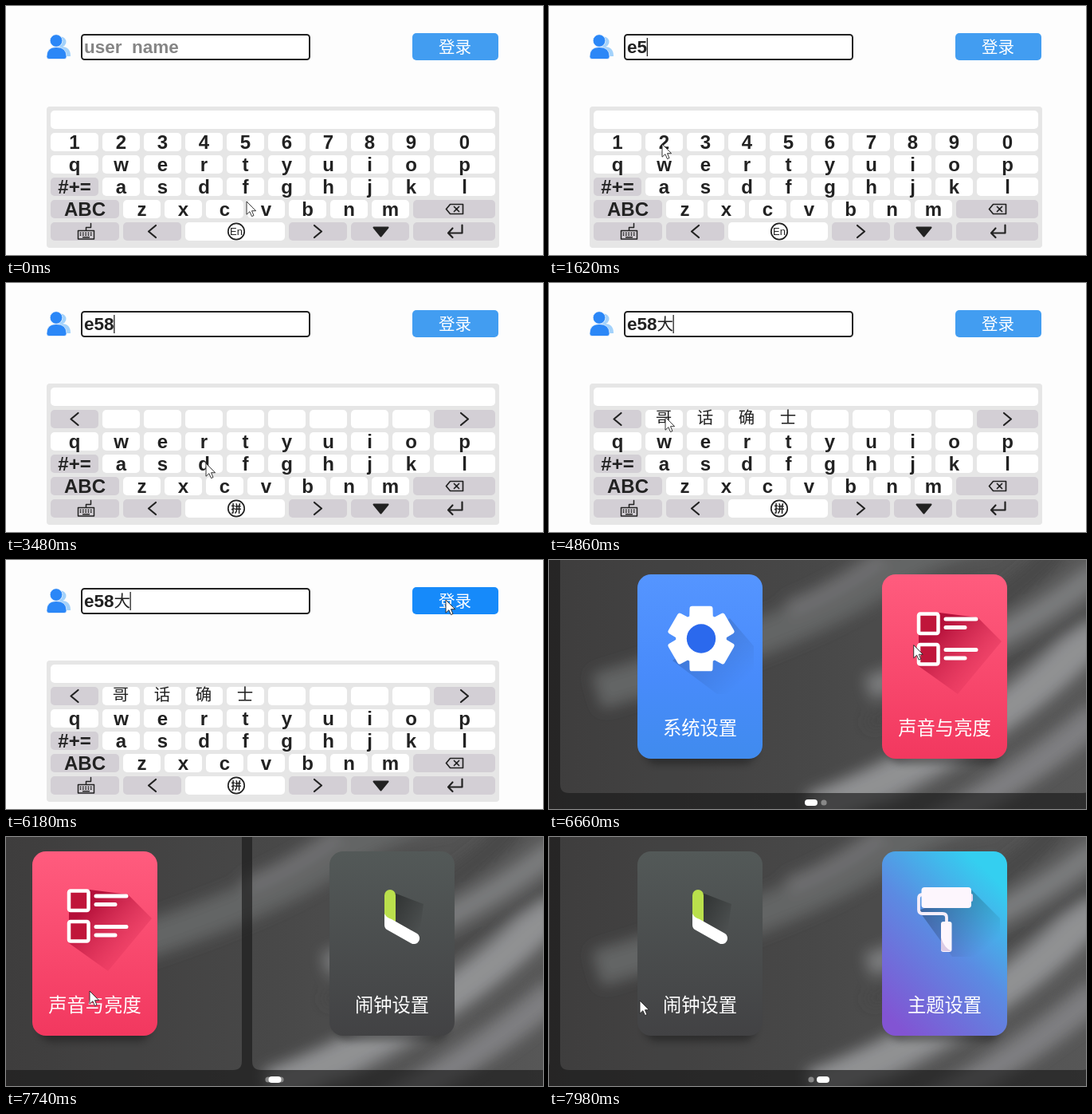
These frames come from a looping animation (674 px wide and 312 px high, 8000 ms). An HTML page:

```html
<!DOCTYPE html>
<html lang="zh-CN">
<head>
<meta charset="utf-8">
<title>Keyboard and home screen</title>
<style>
html, body { margin: 0; width: 100%; height: 100%; overflow: hidden; background: #fdfdfd; }
svg { display: block; width: 674px; height: 312px; }
text { font-family: "Liberation Sans", Arial, "Noto Sans CJK SC", "Noto Sans CJK", sans-serif; }
.key { font-size: 24px; font-weight: bold; fill: #222; text-anchor: middle; }
.han { font-family: "Noto Sans CJK SC", "Noto Sans CJK", sans-serif; font-weight: 300; font-size: 20.5px; text-anchor: middle; }
.label { font-family: "Noto Sans CJK SC", "Noto Sans CJK", sans-serif; font-size: 23.3px; fill: #fff; text-anchor: middle; }
.entry { font-size: 22.5px; font-weight: bold; white-space: pre; }
.line { fill: none; stroke: #222; stroke-width: 2.2; stroke-linecap: round; stroke-linejoin: round; }
</style>
</head>
<body>
<svg viewBox="0 0 674 312" xmlns="http://www.w3.org/2000/svg">
  <defs>
    <linearGradient id="blue" x2="0" y2="1"><stop stop-color="#5595ff"/><stop offset=".55" stop-color="#488bfb"/><stop offset="1" stop-color="#408bee"/></linearGradient>
    <linearGradient id="red" x2="0" y2="1"><stop stop-color="#ff5c7e"/><stop offset="1" stop-color="#f2385f"/></linearGradient>
    <linearGradient id="gray" x2="0" y2="1"><stop stop-color="#535958"/><stop offset="1" stop-color="#424244"/></linearGradient>
    <linearGradient id="theme" x1=".85" y1="0" x2=".2" y2="1"><stop offset=".08" stop-color="#34cff0"/><stop offset=".5" stop-color="#5b8be2"/><stop offset="1" stop-color="#8254d3"/></linearGradient>
    <linearGradient id="shade" x1="0" y1="0" x2=".85" y2=".85"><stop offset=".2" stop-opacity=".36"/><stop offset="1" stop-opacity="0"/></linearGradient>
    <linearGradient id="crimson" x1="0" y1="0" x2=".85" y2=".85"><stop offset=".25" stop-color="#b00c36" stop-opacity=".95"/><stop offset="1" stop-color="#d02850" stop-opacity="0"/></linearGradient>
    <linearGradient id="base"><stop stop-color="#282727"/><stop offset=".5" stop-color="#333"/><stop offset="1" stop-color="#444"/></linearGradient>
    <filter id="soft" filterUnits="userSpaceOnUse" x="-60" y="-60" width="800" height="440"><feGaussianBlur stdDeviation="9"/></filter>
    <filter id="drop" x="-20%" y="-20%" width="140%" height="140%"><feGaussianBlur stdDeviation="5"/></filter>
  </defs>

  <g id="login">
    <rect width="674" height="312" fill="#fdfdfd"/>
    <g fill="#a3d2fb"><circle cx="69" cy="45" r="6.5"/><path d="M60 63q0-12 10-12 11 0 11 12z"/></g>
    <g fill="#2b87f7" stroke="#fdfdfd" stroke-width=".7"><circle cx="63" cy="43.5" r="7.8"/><path d="M51 63.5q0-12 12-12 13 0 13 12 0 3-3 3H54q-3 0-3-3z"/></g>
    <rect x="95" y="36" width="286" height="31" rx="3.5" fill="#fff" stroke="#222" stroke-width="2"/>
    <text id="entry" class="entry" x="98" y="59"></text>
    <rect id="caret" y="40" width="1.3" height="23" fill="#222"/>
    <rect id="button" x="510" y="34" width="108" height="34" rx="5"/>
    <text class="han" x="563.5" y="58.5" fill="#fff">登录</text>
    <rect x="51" y="126" width="568" height="177" rx="4" fill="#e6e6e6"/>
    <rect x="56" y="131" width="558" height="23" rx="5" fill="#fff"/>
    <text id="pinyin" x="61" y="149" font-size="20" font-weight="bold" fill="#222"></text>
    <g id="keys"></g>
    <g id="digits"></g>
    <g id="picks"></g>
  </g>

  <g id="home">
    <rect width="674" height="312" fill="url(#base)"/>
    <g filter="url(#soft)" fill="none" id="folds"></g>
    <g id="pages"></g>
    <g id="dots"><circle r="3.6" cx="329" cy="304" fill="#888"/><circle r="3.6" cx="345" cy="304" fill="#888"/><rect id="pill" y="300" width="16" height="8" rx="4" fill="#fff"/></g>
  </g>

  <path id="mouse" d="M0 0V16.2L3.9 12.7 6.5 18.6 9 17.5 6.5 11.7H11.6Z" fill="#fff" stroke="#222" stroke-width=".9"/>
</svg>
<script>
const $ = id => document.getElementById(id);
const add = (id, html) => $(id).insertAdjacentHTML('beforeend', html);
const PITCH = 680;

// Keyboard
const colX = i => i ? 69 + 52 * i : 56;
const colW = i => i === 0 ? 60 : i === 9 ? 77 : 47;
const rowY = r => 159 + 28 * r;
function key(into, x, w, row, body = '', special = false) {
  const cx = x + w / 2, y = rowY(row);
  const inner = body.startsWith('<')
    ? `<g transform="translate(${cx} ${y + 11.5})">${body}</g>`
    : `<text class="key" x="${cx}" y="${y + 19.5}">${body}</text>`;
  add(into, `<rect x="${x}" y="${y}" width="${w}" height="23" rx="5" fill="${special ? '#d3cfd5' : '#fff'}"/>${inner}`);
}
const chevron = s => `<path class="line" d="M${4.5 * s}-7.5L${-4.5 * s} 0 ${4.5 * s} 7.5"/>`;
const ring = inner => `<g transform="translate(1.5 0)"><circle class="line" r="10.2" style="stroke-width:1.7"/>${inner}</g>`;
const icons = {
  board: `<g transform="translate(1.5 0)"><path class="line" style="stroke-width:1.5" d="M-10-1H10V9.500H-10ZM0-1V-5H6V-10"/>
    <path class="line" style="stroke-width:1.8;stroke-dasharray:.1 3.2" d="M-7 2H8M-7 4.500H8"/><path class="line" style="stroke-width:1.4" d="M-4 7.300H4"/></g>`,
  back: `<path class="line" style="stroke-width:1.7" d="M-10 0L-5-6H11V6H-5ZM0-3L6 3M6-3L0 3"/>`,
  down: `<path d="M-8-5H10L1 6Z" fill="#222" stroke="#222" stroke-width="2" stroke-linejoin="round"/>`,
  enter: `<path class="line" d="M10-8V2H-7M-2-4L-7.500 2-2 7.500"/>`,
  en: ring('<text class="key" y="4.500" style="font-size:13px;font-weight:normal">En</text>'),
  pin: ring('<text class="han" y="4.800" style="font-size:13px;font-weight:700" fill="#222">拼</text>')
};
[...'1234567890'].forEach((c, i) => {
  key('digits', colX(i), colW(i), 0, c);
  const edge = i === 0 || i === 9;
  key('picks', colX(i), colW(i), 0, edge ? chevron(i ? -1 : 1) : '', edge);
  if (!edge) add('picks', `<text class="han pick" x="${colX(i) + 23}" y="176" fill="#222"></text>`);
});
[...'qwertyuiop'].forEach((c, i) => key('keys', colX(i), colW(i), 1, c));
['#+=', ...'asdfghjkl'].forEach((c, i) => key('keys', colX(i), colW(i), 2, c, !i));
key('keys', 56, 86, 3, 'ABC', true);
[...'zxcvbnm'].forEach((c, i) => key('keys', 147 + 52 * i, 47, 3, c));
key('keys', 511, 103, 3, icons.back, true);
key('keys', 56, 86, 4, icons.board, true);
key('keys', 147, 73, 4, chevron(1), true);
key('digits', 225, 125, 4, icons.en);
key('picks', 225, 125, 4, icons.pin);
key('keys', 355, 73, 4, chevron(-1), true);
key('keys', 433, 73, 4, icons.down, true);
key('keys', 511, 103, 4, icons.enter, true);

// Backdrop folds: path, width, tone
[['M60 165Q300 95 400 32T560-30', 46, '#515253'], ['M300 62Q360 40 420-5', 22, '#5e5f60'],
 ['M400 160Q560 115 690 15', 30, '#6c6d6e'], ['M330 315Q560 228 690 85', 46, '#838486'],
 ['M470 340Q600 272 690 195', 36, '#6f7072'], ['M400 205Q570 150 690 58', 15, '#333'],
 ['M420 310Q590 255 690 160', 14, '#444'], ['M470 100Q570 60 640-15', 26, '#303030']]
  .forEach(([d, w, c]) => add('folds', `<path d="${d}" stroke="${c}" stroke-width="${w}"/>`));

// Cards, drawn around their own top left corner
function gear() {
  const pts = [];
  for (let k = 0; k < 6; k++)
    for (const [r, d] of [[29, -24], [39.5, -17], [39.5, 17], [29, 24]]) {
      const a = (k * 60 - 90 + d) * Math.PI / 180;
      pts.push((80 + r * Math.cos(a)).toFixed(1) + ',' + (80.5 + r * Math.sin(a)).toFixed(1));
    }
  return `<path d="M44 108L116 55 146 90V150H100Z" fill="url(#shade)" opacity=".5"/>
    <polygon points="${pts.join(' ')}" fill="#fff" stroke="#fff" stroke-width="6" stroke-linejoin="round"/>
    <circle cx="80" cy="80.5" r="18.2" fill="#2b69ed"/>`;
}
const item = y => `<rect x="46" y="${y}" width="24.500" height="24.500" rx="2" fill="#c0153a" stroke-width="4.500"/>
  <path d="M80 ${y + 6.500}H118M80 ${y + 17}H104" stroke-width="5" stroke-linecap="round"/>`;
const art = {
  gear: gear(),
  list: `<path d="M46 115V72L72 48 120 54 150 84 95 150Z" fill="url(#crimson)"/>
    <g stroke="#fff" fill="none">${item(49.5)}${item(88)}</g>`,
  clock: `<path d="M76 50L118 66 112 110 76 90Z" fill="url(#shade)"/>
    <path d="M69 55a7 7 0 0 1 14 0V92H69Z" fill="#bae04c"/>
    <path d="M69 78Q71 83 78 85L110 103a7.200 7.200 0 0 1-7 12.500L72 98Q69 96 69 92Z" fill="#fff"/>`,
  roller: `<path d="M46 74L112 48 148 84V132H88Z" fill="url(#shade)" opacity=".8"/>
    <path d="M51 54Q46 54 46 59V73Q46 78 51 78H76Q81 78 81 83V90" fill="none" stroke="#f6eef9" stroke-width="3.800"/>
    <rect x="108" y="53" width="6" height="10" rx="2" fill="#e3d5ef"/>
    <rect x="49.500" y="45" width="62.500" height="26" rx="4" fill="#fdf6fd"/>
    <rect x="74" y="88" width="13.500" height="38" rx="3" fill="#fdf6fd"/><path d="M74 108Q78 121 87 125H77Q74 125 74 122Z" fill="#dccbe5"/>`
};
// Everything around the two panels is dimmed
const panel = x => `M${x}-30H${x + 667}V281q0 11-11 11H${x + 11}q-11 0-11-11Z`;
const panels = panel(14) + panel(14 + PITCH);
add('pages', `<path d="M-700-40H2100V320H-700Z${panels}" fill-rule="evenodd" fill="#262525" fill-opacity=".68"/>
  <path d="${panels}" fill="#fff" fill-opacity=".1"/>`);
[[111, 'blue', 'gear', '系统设置'], [418, 'red', 'list', '声音与亮度'],
 [111 + PITCH, 'gray', 'clock', '闹钟设置'], [418 + PITCH, 'theme', 'roller', '主题设置']]
  .forEach(([x, fill, icon, name]) => add('pages', `<g transform="translate(${x} 18)">
    <rect x="8" y="14" width="141" height="224" rx="17" opacity=".32" filter="url(#drop)"/>
    <rect width="157" height="231" rx="17" fill="url(#${fill})"/>${art[icon]}
    <text class="label" x="78.500" y="201">${name}</text></g>`));

// Timing
const mouse = [[0, 302, 245], [120, 292, 243], [600, 141, 225], [840, 141, 225], [1260, 84, 171], [1440, 84, 171],
  [1620, 142, 173], [1860, 142, 173], [2400, 288, 280], [2760, 288, 280], [3360, 251, 226], [3720, 251, 226],
  [4080, 218, 198], [4560, 146, 168], [4860, 146, 168], [5100, 207, 166], [5640, 573, 42], [5880, 553, 49],
  [5940, 552, 50], [6300, 552, 50], [7140, 332, 182], [7380, 330, 182], [7440, 319, 182], [7500, 262, 184],
  [7620, 130, 191], [7680, 107, 193], [7740, 105, 193], [7980, 114, 205]];
const swipe = [[7380, 0], [7440, -11], [7500, -68], [7620, -200], [7680, -250], [7740, -385], [7800, -515],
  [7860, -610], [7920, -665], [7980, -PITCH]];
const entries = [[0, ''], [720, 'e'], [1380, 'e5'], [1800, 'e58'], [4740, 'e58大']];
const choices = [[0, ''], [3600, '大到都等点对多地'], [4740, '哥话确士']];

function tween(table, t) {
  const i = table.findIndex(k => k[0] > t);
  if (i < 0) return table.at(-1).slice(1);
  if (i === 0) return table[0].slice(1);
  const a = table[i - 1], b = table[i], u = (t - a[0]) / (b[0] - a[0]);
  return a.slice(1).map((v, n) => v + (b[n + 1] - v) * u);
}
const step = (table, t) => table.filter(k => k[0] <= t).at(-1)[1];
const show = (id, on) => $(id).style.display = on ? '' : 'none';
const picks = [...document.querySelectorAll('.pick')];

function draw(t) {
  const home = t >= 6240, chinese = t >= 2640;
  show('login', !home);
  show('home', home);
  show('digits', !chinese);
  show('picks', chinese);

  const typed = step(entries, t), entry = $('entry');
  entry.textContent = typed || 'user\u00a0\u00a0name';
  entry.setAttribute('fill', typed ? '#222' : '#858585');
  const wide = typed.length > 3;
  if (wide) entry.innerHTML = `${typed.slice(0, 3)}<tspan font-weight="300" font-size="20.5">${typed[3]}</tspan>`;
  show('caret', typed);
  $('caret').setAttribute('x', wide ? 155.5 : 97.7 + 12.5 * typed.length);
  $('button').setAttribute('fill', t >= 6120 ? '#168afa' : '#429df1');
  $('pinyin').textContent = t >= 3600 && t < 4740 ? 'd' : '';
  const chars = step(choices, t);
  picks.forEach((p, i) => p.textContent = chars[i] || '');

  const [x] = tween(swipe, t);
  $('pages').setAttribute('transform', `translate(${x} 0)`);
  $('pill').setAttribute('x', 321 - 15 * x / PITCH);
  $('mouse').setAttribute('transform', `translate(${tween(mouse, t).join(' ')})`);
}

const start = performance.now();
function loop(now) {
  const t = Math.max(0, now - start) % 8000;
  draw(Math.floor(t / 60) * 60);
  requestAnimationFrame(loop);
}
draw(0);
requestAnimationFrame(loop);
</script>
</body>
</html>
```
